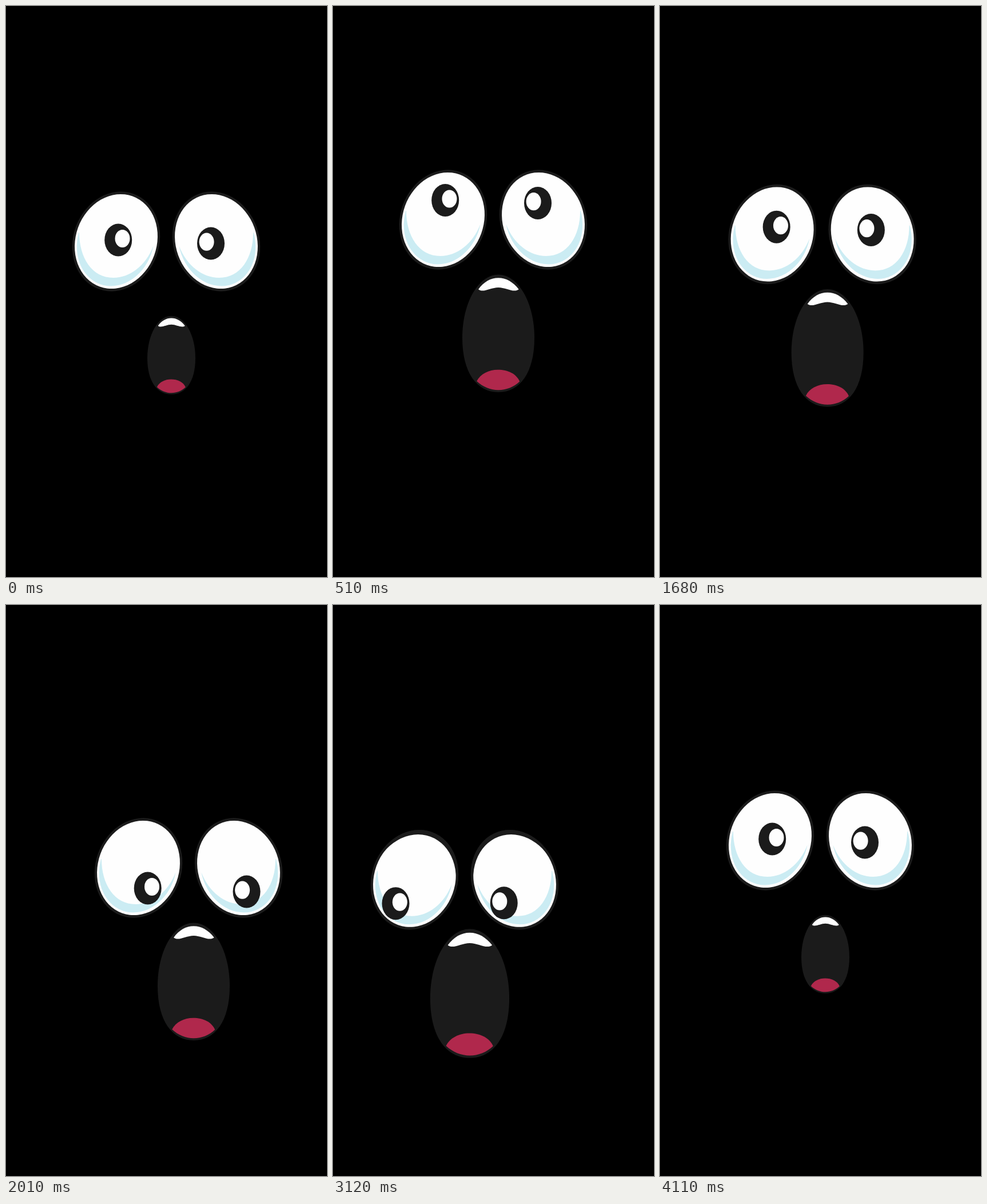
Animation of 561x998 px, one loop 4500 ms. Source, as an HTML page with a canvas:

```html
<!DOCTYPE html>
<html lang="en">
<head>
<meta charset="utf-8">
<title>Surprised face</title>
<style>
  html, body { margin: 0; width: 100%; height: 100%; overflow: hidden; background: #000; }
  canvas { display: block; width: 100%; height: 100%; }
</style>
</head>
<body>
<canvas id="stage" width="561" height="998"></canvas>
<script>
const ctx = document.getElementById('stage').getContext('2d');
const LOOP = 4500, STEP = 30, TILT = Math.PI / 9;
const DARK = '#1b1b1b', WHITE = '#fefefe', BLUE = '#cbecf3', PINK = '#b0284c';

// Pose: head x, y; mouth scale; left pupil x, y; right pupil x, y
const rest  = [0, 0, 1, 0, 0, 0, 0];
const up    = [0, -38, 1.5, 0, -31.5, 0, -32.5];
const right = [39, 48, 1.5, 12.5, 38, 23.5, 38];
const left  = [-51, 68.5, 1.665, -37, 44, -9.5, 37];

// bend: control point of a curved head path
const moves = [
  { start: 0,    end: 510,  from: rest,  to: up,    k: .65 },
  { start: 1410, end: 2010, from: up,    to: right, k: .78, bend: [0, 3] },
  { start: 2730, end: 3150, from: right, to: left,  k: .5,  bend: [17, 85], blink: true },
  { start: 3750, end: 4110, from: left,  to: rest,  k: .5 }
];

const teeth = new Path2D(`M-23.3-51.3C-17-60-9-64.6 0-64.6C9-64.6 17-60 23.8-51.3
  C18-46.8 9-53.5 0-53.5C-9-53.5-18-46.8-23.3-51.3Z`);
const tongue = new Path2D(`M-25.2 55.7C-21 47-11 42.3-.5 42.3C11 42.3 21 47 24.8 56
  C18 62.5 9 66 0 66C-9 66-18 62.5-25.2 55.7Z`);
const lips = new Path2D(`M-42 5C-42-35.6-23.2-68.5 0-68.5C23.2-68.5 42-35.6 42 5
  C42 46 25 68.5 0 68.5C-25 68.5-42 46-42 5Z`);

// Symmetric cubic-bezier(k, 0, 1 - k, 1)
function ease(u, k) {
  let lo = 0, hi = 1, t = .5;
  for (let i = 0; i < 24; i++) {
    t = (lo + hi) / 2;
    const x = 3 * t * (1 - t) * ((1 - t) * k + t * (1 - k)) + t * t * t;
    if (x < u) lo = t; else hi = t;
  }
  return t * t * (3 - 2 * t);
}

function poseAt(time) {
  const move = moves.filter(m => m.start <= time).pop();
  const u = Math.min(1, (time - move.start) / (move.end - move.start));
  const p = u < 1 ? ease(u, move.k) : 1;
  const pose = move.from.map((a, i) => a + (move.to[i] - a) * p);
  if (move.bend) {
    move.bend.forEach((c, i) => {
      pose[i] = (1 - p) ** 2 * move.from[i] + 2 * p * (1 - p) * c + p * p * move.to[i];
    });
  }
  const blink = move.blink && u < 1 ? Math.sin(Math.PI * u) ** 2 : 0;
  pose[2] -= .385 * blink;
  return { pose, blink };
}

function oval(x, y, rx, ry, color, turn = 0) {
  ctx.beginPath();
  ctx.ellipse(x, y, rx, ry, turn, 0, 2 * Math.PI);
  ctx.fillStyle = color;
  ctx.fill();
}

function fill(path, color) {
  ctx.fillStyle = color;
  ctx.fill(path);
}

function eyeball(x, side) {
  ctx.save();
  ctx.translate(x, 411.5);
  ctx.scale(side, 1);
  oval(0, 0, 75, 88.7, DARK, TILT);
  oval(0, 0, 70.8, 84, WHITE, TILT);
  ctx.beginPath();
  ctx.ellipse(-1, 0, 66, 79.5, TILT, 3.047, -.195, true);
  ctx.bezierCurveTo(52, 42, 24, 63.5, -5, 63.5);
  ctx.bezierCurveTo(-42, 63.5, -64.5, 29, -64.5, -15.5);
  ctx.fillStyle = BLUE;
  ctx.fill();
  ctx.restore();
}

function pupil(x, y, shineX, shineY) {
  oval(x, y, 24, 28.5, DARK);
  oval(x + shineX, y + shineY, 13, 15.6, WHITE);
}

function lid(x, side, blink) {
  ctx.save();
  ctx.translate(x, 411.5);
  ctx.scale(side, 1);
  ctx.rotate(TILT);
  ctx.beginPath();
  ctx.ellipse(0, 7, 73, 91 - 74 * blink, 0, Math.PI, 2 * Math.PI);
  ctx.ellipse(0, 0, 75, 88.7, 0, .08, Math.PI - .08, true);
  ctx.fillStyle = DARK;
  ctx.fill();
  ctx.restore();
}

function draw(time) {
  const { pose: [x, y, size, lx, ly, rx, ry], blink } = poseAt(time);
  ctx.fillStyle = '#000';
  ctx.fillRect(0, 0, 561, 998);
  ctx.save();
  ctx.translate(x, y);

  eyeball(192.5, 1);
  eyeball(367.5, -1);
  pupil(196.2 + lx, 409 + ly, 7.3, -2.5);
  pupil(358 + rx, 415 + ry, -7.4, -2.8);
  if (blink) {
    lid(192.5, 1, blink);
    lid(367.5, -1, blink);
  }

  ctx.translate(289, 610.2);
  ctx.scale(size, size);
  fill(lips, DARK);
  fill(teeth, WHITE);
  fill(tongue, PINK);
  ctx.restore();
}

const begin = performance.now();
function tick() {
  const time = (performance.now() - begin) % LOOP;
  draw(Math.floor(time / STEP) * STEP);
  requestAnimationFrame(tick);
}
tick();
</script>
</body>
</html>
```
